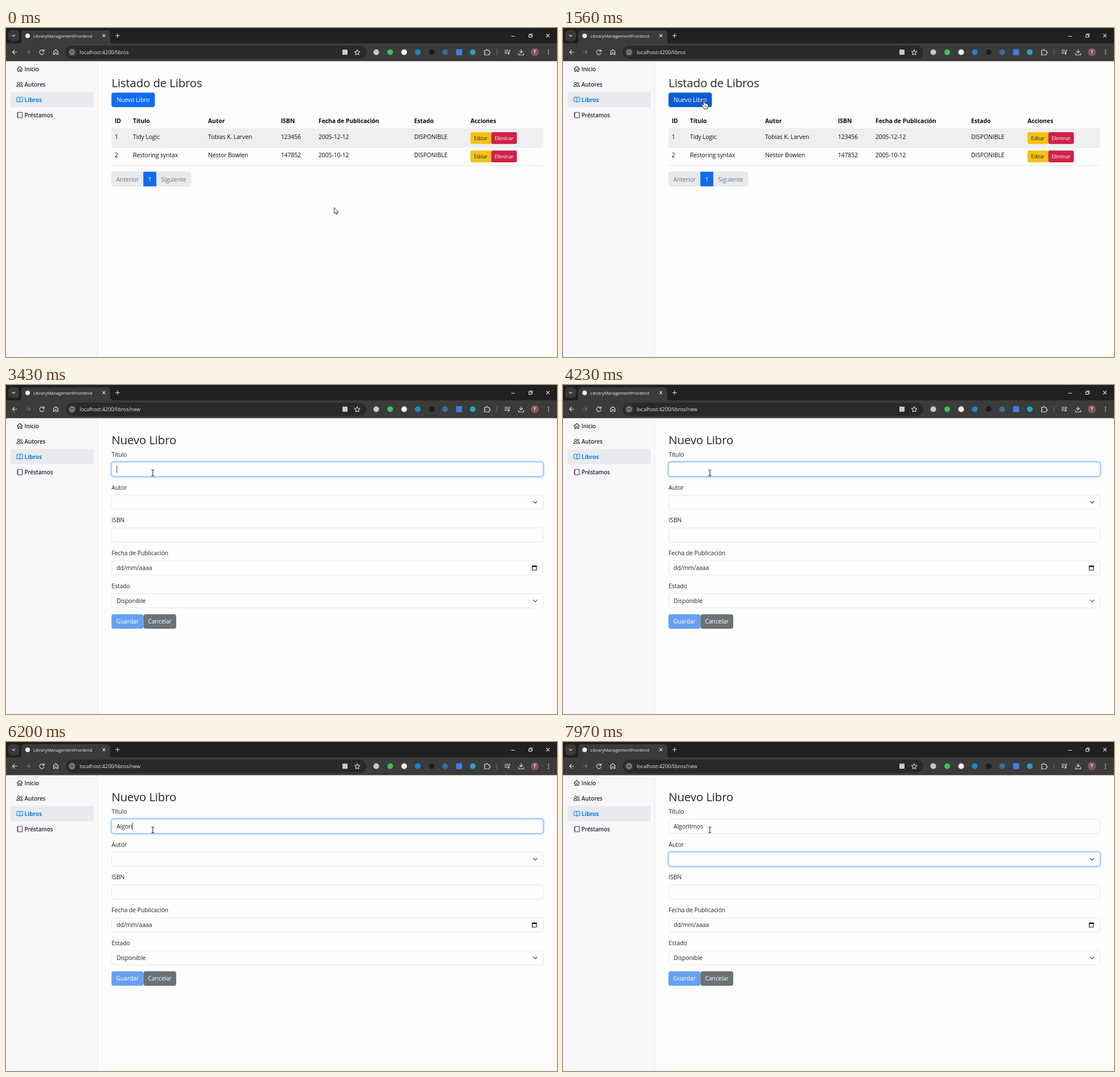
Recreate the animation shown at these times as an HTML page. Size 968x578 px, loop 8000 ms.

```html
<!DOCTYPE html>
<html lang="es">
<head>
<meta charset="utf-8">
<title>LibraryManagementFrontend</title>
<style>
  html, body { margin: 0; width: 100%; height: 100%; overflow: hidden; background: #fdfdfc; }
  svg { display: block; width: 100vw; height: 100vh; }
  text { font: 10.4px "Open Sans", "Noto Sans", sans-serif; letter-spacing: -.007em; fill: #212529; white-space: pre; }
  .title { font-size: 20.4px; font-weight: 500; }
  .head { font-weight: 700; fill: #0b0b0b; }
  .cell { fill: #0b0b0b; }
  .nav { font-size: 9.9px; font-weight: 600; }
  .active { font-size: 10.1px; font-weight: 700; fill: #0a80e8; }
  .white { fill: #fff; }
  .muted { fill: #6c757d; }
  .small { font-size: 8.8px; }
  .tab { font-size: 7.65px; fill: #eee; }
  .url { font-size: 9px; fill: #e8e8e8; }
  .mid { text-anchor: middle; }
  .line { fill: none; stroke: currentColor; stroke-width: 1.1; stroke-linecap: round; stroke-linejoin: round; }
</style>
</head>
<body>
<svg id="stage" viewBox="0 0 968 578" preserveAspectRatio="none"></svg>
<script>
const LOOP = 8000;
const PAGE_AT = 2050, TITLE_FOCUS = 3200, AUTHOR_FOCUS = 7150;
const WORD = "Algoritmos";
const KEY_TIMES = [4950, 5300, 5500, 5680, 5900, 6120, 6330, 6500, 6660, 6830];
const MOVES = [
  { from: 880, to: 1450, a: [576.5, 315.5], b: [247.5, 127] },
  { from: 2150, to: 2400, a: [247.5, 127], b: [242.7, 126.5] },
  { from: 2720, to: 3100, a: [242.7, 126.5], b: [258, 154.5] }
];

const text = (x, y, str, cls = "", id = "") => `<text x="${x}" y="${y}" class="${cls}" id="${id}">${str}</text>`;
const rect = (x, y, w, h, fill, r = 0, more = "") =>
  `<rect x="${x}" y="${y}" width="${w}" height="${h}" rx="${r}" fill="${fill}" ${more}/>`;
const circle = (x, y, r, fill, more = "") => `<circle cx="${x}" cy="${y}" r="${r}" fill="${fill}" ${more}/>`;
const line = (d, color = "#ddd", more = "") => `<path class="line" d="${d}" color="${color}" ${more}/>`;
const group = (id, body) => `<g id="${id}">${body}</g>`;

function browserBar() {
  const extensions = [[650.5, "#c9cacc"], [675, "#3fbd62"], [699.5, "#f2f2f2"], [723.5, "#1687d0"],
    [748, "#1d1d1d"], [771.5, "#416a9c"], [796, "#3f7de0", true], [820, "#25a3cc"]];
  return rect(0, 0, 968, 28, "#1f201f") +
    rect(4, 4, 19, 19, "#383938", 6) + line("M11 12.5l2.4 2.4 2.4-2.4") +
    `<path d="M21 27.5q6 0 6-6V10q0-6 6-6H177q6 0 6 6v11.500q0 6 6 6z" fill="#3b3c3a"/>` +
    rect(0, 27, 968, 31.3, "#3b3c3a") +
    circle(38, 13.7, 4, "#f2f2f2") + text(48, 16.5, "LibraryManagementFrontend", "tab") +
    line("M169.700 11.200l4.600 4.600m0-4.600l-4.600 4.600M192.500 13.500h7m-3.500-3.500v7") +
    line("M888 14.500h6M918.500 12h4.500v4.500h-4.500zM920 12v-1.500h4.500v4.500h-1.500M949.500 11l5 5m0-5l-5 5") +
    line("M19 42.500h-7.500m3.500-3.500l-3.500 3.500 3.500 3.500") +
    line("M35.500 42.500h7m-3.500-3.500l3.500 3.500-3.500 3.500", "#777") +
    line("M66.500 40.500a4 4 0 1 0 .5 3M67 38v3h-3") +
    line("M83.500 41.500l4-3.500 4 3.500v5h-2.500v-3h-3v3h-2.500z") +
    rect(105, 31, 528, 23.500, "#282928", 11.7) +
    circle(116, 42.5, 7.8, "#3b3c3a") +
    circle(116, 42.5, 4, "none", `stroke="#ddd"`) + line("M116 42.300v2.200M116 40.400v.1") +
    text(129.5, 45.7, "localhost:4200/libros", "url", "url") +
    rect(591, 38, 9, 9, "#c9cac8", 1) +
    line("M617 38l1.400 3 3.300.4-2.400 2.300.6 3.300-2.900-1.600-2.900 1.600.6-3.300-2.400-2.300 3.300-.4z") +
    extensions.map(([x, color, square]) =>
      square ? rect(x - 5.3, 37.2, 10.6, 10.6, color, 1) : circle(x, 42.5, 5, color)).join("") +
    line("M840.500 39.500h3v-.7a1.300 1.300 0 0 1 2.600 0v.7h2.900v2.600h.5a1.300 1.300 0 0 1 0 2.600h-.5v2.500h-8.500v-2.600a1.300 1.300 0 0 0 0-2.600z") +
    line("M862.500 38v9.500", "#666") +
    line("M876.500 39h5.500M876.500 41.700h5.500M876.500 44.400h3M885.500 39h-1.700v6") + circle(882.700, 45, 1.5, "#ddd") +
    line("M905 38v5.500m-2.700-2.500l2.700 2.700 2.700-2.700M900.500 44.500v2.700h9v-2.700") +
    circle(929, 42.5, 7, "#87575a") + text(929, 45.2, "Y", "small white mid") +
    [39, 42.5, 46].map(y => circle(953, y, .9, "#ddd")).join("");
}

function sidebar() {
  const icons = line("M19.500 72l4.700-4.500 4.700 4.500M20.800 71v5.500h2.200v-3.500h2.400v3.500h2.200V71", "#333") +
    circle(22, 97, 2, "none", `stroke="#333"`) + circle(26.5, 97, 1.6, "none", `stroke="#333"`) +
    line("M18.800 102.800q0-3 3.200-3t3.200 3zM26.500 100q2.700 0 2.700 2.800h-2.500", "#333") +
    line("M24.200 122.500q-2.500-1.500-5-.6v7.600q2.500-.8 5 .6 2.500-1.400 5-.6v-7.600q-2.500-.9-5 .6zv7.600", "#0a80e8") +
    line("M20.500 148.200h8v9.600h-8zM19.300 150.500h2M19.300 153h2M19.300 155.500h2", "#5d3153");
  return rect(0, 58.3, 161, 520, "#f8f8fa") + rect(160.5, 58.3, 1, 520, "#e6e6ec") +
    rect(8, 112.5, 146, 26.8, "#e8eaed") + icons +
    text(32.5, 75.7, "Inicio", "nav") + text(32.5, 102.6, "Autores", "nav") +
    text(32.5, 129.6, "Libros", "active") + text(32.5, 156.5, "Préstamos", "nav");
}

function listPage() {
  const columns = [191, 223, 355, 483, 549, 717, 816];
  const row = (cells, y, cls) => cells.map((cell, i) => text(columns[i], y, cell, cls)).join("");
  const actions = y => rect(816, y, 36.5, 20.8, "#f5c211", 3) + rect(852.500, y, 45, 20.8, "#ce2147", 3) +
    text(834.2, y + 13.7, "Editar", "small mid") + text(875, y + 13.7, "Eliminar", "small white mid");
  return text(185.5, 104, "Listado de Libros", "title") +
    rect(185.3, 113.5, 76.3, 25.5, "#116cf2", 4, `id="newButton"`) +
    text(223.4, 130.2, "Nuevo Libro", "white mid") +
    row(["ID", "Título", "Autor", "ISBN", "Fecha de Publicación", "Estado", "Acciones"], 167.3, "head") +
    rect(185.3, 177, 758.5, 32.5, "#efefef") + rect(185.3, 176.7, 758.5, .7, "#dee2e6") +
    rect(185.3, 209.2, 758.5, .7, "#dee2e6") + rect(185.3, 241.2, 758.5, .8, "#dee2e6") +
    row(["1", "Tidy Logic", "Tobias K. Larven", "123456", "2005-12-12", "DISPONIBLE"], 194.9, "cell") + actions(183) +
    row(["2", "Restoring syntax", "Nestor Bowlen", "147852", "2005-10-12", "DISPONIBLE"], 227.3, "cell") + actions(215.2) +
    rect(185.6, 252.8, 139.200, 25.2, "#e8ebee", 4, `stroke="#dee2e6" stroke-width=".7"`) +
    rect(241.3, 252.5, 22.8, 25.7, "#116cf2") +
    text(213.5, 269.6, "Anterior", "muted mid") + text(252.7, 269.6, "1", "white mid") +
    text(294.5, 269.6, "Siguiente", "muted mid");
}

function formPage() {
  const labels = ["Título", "Autor", "ISBN", "Fecha de Publicación", "Estado"];
  const fieldTop = i => 135.5 + 57.8 * i;
  const fields = labels.map((label, i) =>
    text(185.5, fieldTop(i) - 9.7, label) +
    rect(185.6, fieldTop(i), 758, 25, "#fdfdfc", 4, `stroke="#dee2e6" stroke-width=".8"`)).join("");
  const focus = (id, i) => group(id,
    rect(184.6, fieldTop(i) - 1, 760, 27, "none", 5, `stroke="#c2dbfe" stroke-width="2.800"`) +
    rect(185.6, fieldTop(i), 758, 25, "#fdfdfc", 4, `stroke="#86b7fe" stroke-width=".9"`));
  const chevron = i => line(`M926.500 ${fieldTop(i) + 11}l3.200 3.200 3.200-3.200`, "#343a40", `stroke-width="1.3"`);
  return text(185.5, 104, "Nuevo Libro", "title") + fields +
    focus("titleFocus", 0) + focus("authorFocus", 1) + chevron(1) + chevron(4) +
    text(194.3, 151.9, "", "", "typed") + rect(194.3, 141.700, .9, 13, "#212529", 0, `id="caret"`) +
    text(194.3, 325.3, "dd/mm/aaaa") + text(194.3, 383.1, "Disponible") +
    line("M924.500 318.200h7.500v7h-7.500z", "#111") + rect(924, 317.2, 8.5, 2.6, "#111", .5) +
    rect(185.3, 402.7, 56.2, 25.5, "#66a0f5", 4) + rect(241.500, 402.7, 57.5, 25.5, "#687277", 4) +
    text(213.4, 419.400, "Guardar", "white mid") + text(270.2, 419.400, "Cancelar", "white mid");
}

const pointers =
  group("arrow", `<path d="M0 0V10.700L2.500 8.500 4.200 12.300 5.900 11.500 4.300 7.800H7.600z" fill="#fff" stroke="#111" stroke-width=".8"/>`) +
  group("hand", `<path d="M-.9 1q0-1.300 1.200-1.300T1.500 1v4.300q1.600-.7 2.300.5 1.500-.5 2 .8 1.700-.2 1.700 1.500v2.500q0 1.900-1.200 3.200v1.500H.4v-1.300L-4 8.700q-.9-1.400.3-1.900 1-.3 2.800 1.700z" fill="#fff" stroke="#111" stroke-width=".9"/><path d="M1.500 9v3M3.300 9v3M5 9v3" stroke="#111" stroke-width=".6"/>`) +
  group("beam", `<path d="M-2.300-5h1.600L0-4.500.7-5h1.600M0-4.500v9M-2.300 5h1.600L0 4.500.7 5h1.600" fill="none" stroke="#111"/>`);

const stage = document.getElementById("stage");
stage.innerHTML = rect(0, 0, 968, 578, "#fdfdfc") + sidebar() + browserBar() +
  group("list", listPage()) + group("form", formPage()) + group("pointer", pointers);

const el = id => document.getElementById(id);
const show = (id, visible) => el(id).setAttribute("visibility", visible ? "inherit" : "hidden");
const progress = (t, from, to) => {
  const p = Math.min(1, Math.max(0, (t - from) / (to - from)));
  return p * p * (3 - 2 * p);
};

function pointerAt(t) {
  const move = MOVES.findLast(m => t >= m.from) || MOVES[0];
  const p = progress(t, move.from, move.to);
  return move.a.map((start, i) => start + (move.b[i] - start) * p);
}

function draw(t) {
  const onForm = t >= PAGE_AT;
  show("list", !onForm);
  show("form", onForm);
  el("url").textContent = "localhost:4200/libros" + (onForm ? "/new" : "");

  const [x, y] = pointerAt(t);
  const onButton = !onForm && x > 185 && x < 262 && y > 113 && y < 139;
  const onField = onForm && y > 135;
  el("pointer").setAttribute("transform", `translate(${x} ${y})`);
  show("hand", onButton);
  show("beam", onField);
  show("arrow", !onButton && !onField);
  el("newButton").setAttribute("fill", onButton ? "#0c5dd0" : "#116cf2");

  const tabbed = progress(t, AUTHOR_FOCUS, AUTHOR_FOCUS + 150);
  el("titleFocus").setAttribute("opacity", progress(t, TITLE_FOCUS, TITLE_FOCUS + 150) * (1 - tabbed));
  el("authorFocus").setAttribute("opacity", tabbed);

  const count = KEY_TIMES.filter(key => t >= key).length;
  const typed = el("typed");
  typed.textContent = WORD.slice(0, count);
  const lastInput = count ? KEY_TIMES[count - 1] : TITLE_FOCUS;
  const blinkOn = (t - lastInput) % 1060 < 530;
  show("caret", t >= TITLE_FOCUS && t < AUTHOR_FOCUS && blinkOn);
  el("caret").setAttribute("x", 194.3 + (count ? typed.getComputedTextLength() : 0));
}

function tick() {
  draw(performance.now() % LOOP);
  requestAnimationFrame(tick);
}
tick();
</script>
</body>
</html>
```
